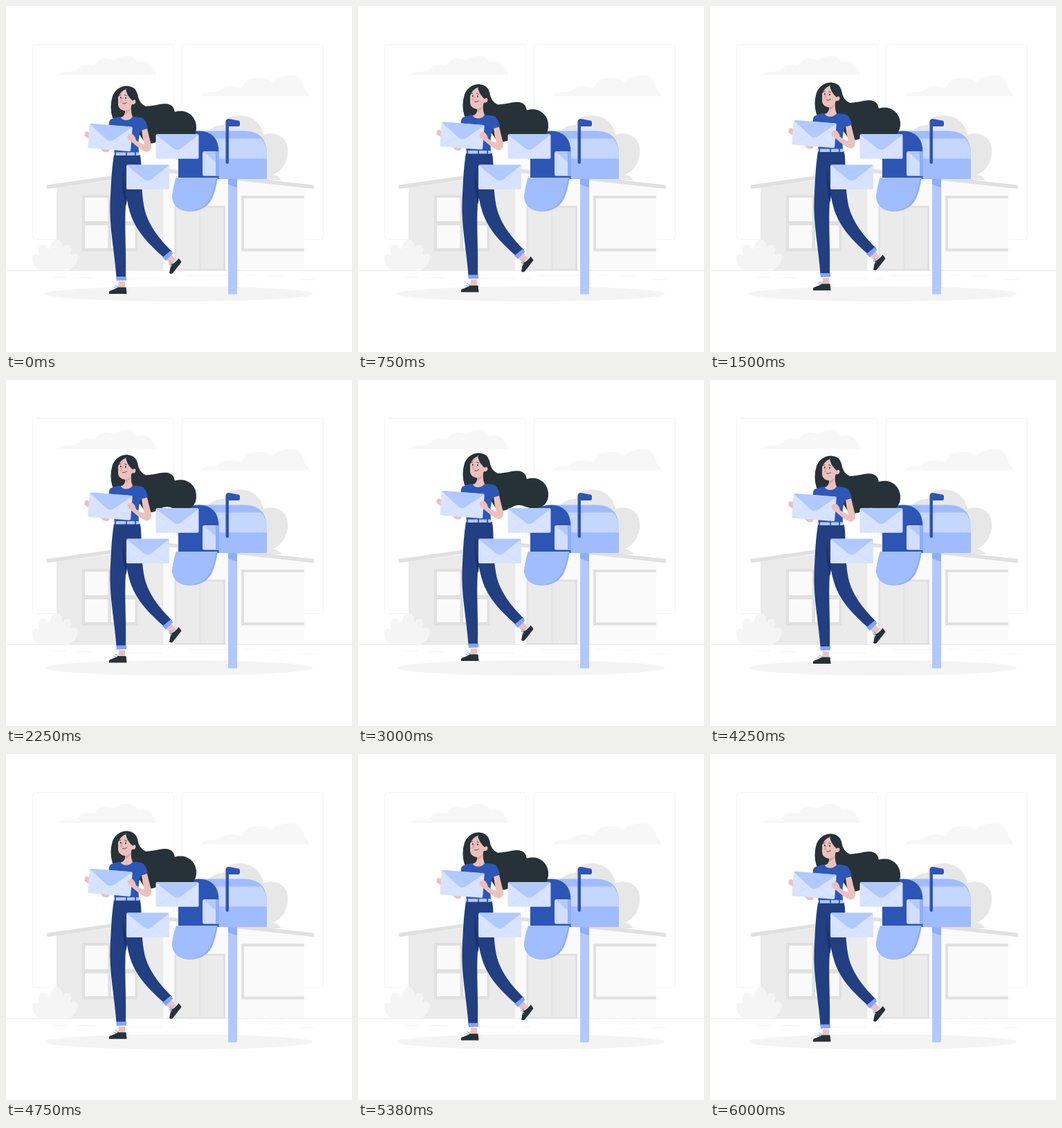
Animation, 500 px wide and 500 px high, one loop 6040 ms. Source, as an HTML page:

```html
<!DOCTYPE html>
<html lang="en">
<head>
<meta charset="utf-8">
<title>Mailbox</title>
<style>
  html, body { margin: 0; width: 100%; height: 100%; overflow: hidden; background: #fff; }
  svg { display: block; width: 100vw; height: 100vh; }
</style>
</head>
<body>
<svg viewBox="0 0 500 500" fill="none">
  <defs>
    <g id="envelope">
      <rect width="62" height="35.5" rx="2" fill="#d8e3ff"/>
      <path d="M1 35 27 17.5H35L61 35" stroke="#cbdaff" stroke-width=".7"/>
      <path d="M.6 1Q1 0 2.5 0H59.5Q61 0 61.4 1L36.5 20.8Q31 25 25.5 20.8Z" fill="#b0c9ff"/>
    </g>
  </defs>

  <g id="backdrop">
    <g stroke="#f3f3f3">
      <rect x="38.5" y="55.5" width="204" height="282" rx="4"/>
      <rect x="254.5" y="55.5" width="204" height="282" rx="4"/>
    </g>
    <g fill="#f7f7f7">
      <path d="M74 99.5Q83 94 94 95Q105 93 108 87Q118 83 127 86Q134 75 145 76Q152 76 156 79Q164 71 177 72Q187 73 190 82Q197 78 204 82Q210 82 212 90Q217 93 216 99.5Z"/>
      <path d="M281 130.5Q287 123 299 124Q306 124 310 121Q318 115 328 116Q336 117 341 119Q346 104 362 104Q376 103 384 110Q394 99 413 100Q429 101 432 122Q438 124 438 130.5Z"/>
    </g>
    <path d="M0 382.5H500" stroke="#ededed"/>
    <path d="M65 392H87M102 392.5H126M176 394H226M240 394H248M262 389.500H330M345 389H360M377 390H402M425 395.500H447" stroke="#f3f3f3"/>
    <path d="M292 181Q302 171 314 172Q319 158 339 158Q366 160 372 186Q391 180 403 194Q412 209 402 230Q396 239 386 244Q395 246 398 252H292Z" fill="#e7e7e7"/>

    <path d="M73 262 236 241V382H73Z" fill="#ebebeb"/>
    <path d="M227 242 245 241 431 261V382H227Z" fill="#fafafa"/>
    <path d="M59 261.500 154 248 236 238.500 445 261.500" stroke="#e0e0e0" stroke-width="5.500"/>
    <path d="M243.500 382V288.500H317V382Z" fill="#e0e0e0"/>
    <path d="M246 380V291H314V380Z" fill="#ebebeb"/>
    <path d="M280.500 291V380" stroke="#e0e0e0"/>
    <path d="M110 273H190V354.500H110Z" fill="#e0e0e0"/>
    <path d="M114 277H147.500V311H114ZM114 317H147.500V350H114ZM152 277H186.500V311H152ZM152 317H186.500V350H152Z" fill="#fafafa"/>
    <path d="M431 276H342V352.500H431" stroke="#e0e0e0" stroke-width="4"/>
    <path d="M47 382Q37 374 38 362Q41 357 48 361Q45 348 51 345Q59 344 63 352Q64 339 74 337Q82 338 81 351Q86 343 93 347Q96 350 93 359Q100 355 104 361Q104 375 91 382Z" fill="#f5f5f5"/>
    <ellipse cx="249.500" cy="416" rx="194" ry="11" fill="#f4f4f4"/>
  </g>

  <g id="mailbox">
    <path d="M321 249H334V416.500H321Z" fill="#b0c9ff"/>
    <path d="M321 249H334V262.500L321 258Z" fill="#8eaefb"/>
    <path d="M278 180.500H346Q377 182 377 214V250H278Z" fill="#9fbcff"/>
    <path d="M300 191.500H368.500Q377 201 377 214V220.500H300Z" fill="#c5d7ff"/>
    <path d="M249 250V211Q250 181 278 180.500Q307 181 307.500 211V250Z" fill="#2d55b5"/>
    <path d="M307.500 210H287Q284 210 284 213V243Q284 245.500 287 245.500H307.500Z" fill="#d0deff"/>
    <path d="M286 210.500H303V226Z" fill="#b0c9ff"/>
    <path d="M303 210H307.500V245.500H303Z" fill="#8eaefb"/>
    <path d="M246 248H306Q303 267 297 280Q287 297 264 297Q242 295 240 276Q241 264 246 248Z" fill="#8eaefb"/>
    <path d="M246 248H303.500Q301 266 294.500 279Q285 295 263 296.500Q242 295 240 276Q241 264 246 248Z" fill="#a0bdff"/>
    <path d="M317.500 226V167Q318 163 322 163L335 165.500Q338 166 338 168V171.500Q338 174 335 174H322V226Q322 228 320 228Q317.500 228 317.500 226Z" fill="#2d55b5"/>
  </g>

  <g id="woman">
    <path d="M154 162Q149 146 154 130Q160 116 175 115.500Q187 116 190 127Q192 141 202 145Q214 144 222 142Q237 139 242 147L244 153Q257 149 267 157Q276 165 275 178Q274 189 264 194Q254 198 242 193Q231 188 222 194Q211 201 201 198L184 172Z" fill="#263238"/>

    <path d="M121 183 116 181 114 183 113.500 188 120 192Z" fill="#ecc1bd"/>
    <path d="M134 204 151 204 149 210Q145 213 140 210Z" fill="#ecc1bd"/>

    <path d="M163 398H172V408H162Z" fill="#ecc1bd"/>
    <path d="M149 416V413Q149.500 411.500 152 411Q158 409 161.500 406.500H173.500L174.500 416Z" fill="#263238"/>
    <path d="M155.500 406 160 408M157.500 403.500 162 406" stroke="#7fa4fb" stroke-width="1.200"/>
    <path d="M231 366 238 358 245 367 239 375Z" fill="#ecc1bd"/>
    <path d="M249.500 364.500Q252 367 253.500 370L241 386Q239 388 236 386Q237 379 239 373.500Q245 371 249.500 364.500Z" fill="#263238"/>
    <path d="M235.500 372.500 240 376M237 370 241 373" stroke="#7fa4fb" stroke-width="1.200"/>

    <path d="M174 217H194C197 230 194 253 199 287C203 315 223 338 240 355L230 365C207 345 185 323 178 294C172 270 168 240 174 217Z" fill="#223f82"/>
    <path d="M156 215H194L190 238L174 247Q177 265 173 287C171 319 174 352 173 392H159.500C157 357 149 318 150.500 284C152 260 152 240 156 215Z" fill="#223f82"/>
    <path d="M169 239Q167 266 173.500 289L175 278Q170 260 170 239Z" fill="#19316a"/>
    <path d="M159 391 174 391 174 396.500 160 397Z" fill="#7fa4fb"/>
    <path d="M226 363.500 238 353.500 241.500 357.500 231 368Z" fill="#7fa4fb"/>

    <path d="M151 164Q159 160 169 160H182Q194 160 199 163Q203 168 205 176L195 180Q190 191 192 212H156.500L155 181L149 174Q148 167 151 164Z" fill="#2d57b7"/>
    <path d="M156.500 211.500H192.500V216H156.500Z" fill="#b0c9ff"/>
    <path d="M158 211V217M174 211V217M187 211V217" stroke="#223f82" stroke-width="1.500"/>

    <path d="M171 147 181 144Q180 154 183 160Q180 165 173 165Q167 164 166 161Q173 159 172 150Z" fill="#ecc1bd"/>
    <path d="M172 150Q178 150 180 147Q179 153 172.500 156Z" fill="#dda39f"/>
    <path d="M162 131Q165 122 174 119Q180 122 183 136Q187 134 187.500 138Q187 143 182 142Q179 151 172 151.500Q163 150 162 143Z" fill="#ecc1bd"/>
    <path d="M174 120Q166 122 162 132Q159 139 162 149L155 148 157 126 174 116ZM173 119Q174 129 183 137L188 133Q187 121 179 118Z" fill="#263238"/>
    <ellipse cx="165.800" cy="132.500" rx=".9" ry="1.300" fill="#263238"/>
    <ellipse cx="173" cy="133" rx=".9" ry="1.300" fill="#263238"/>
    <path d="M163.500 129.300 166 128.500M171.500 128.700 174.500 129.800M168.500 141Q172 142 174.500 139.500" stroke="#263238" stroke-width=".8" stroke-linecap="round"/>
    <path d="M168.500 133 166.800 137 168.300 137.500" stroke="#d48c88" stroke-width=".8"/>
    <circle cx="166" cy="137.500" r="1.700" fill="#e59e9b" opacity=".6"/>

    <use href="#envelope" transform="translate(121 169.800) rotate(4.500)"/>

    <path d="M196 179.500 204 177Q207 190 210 201Q210.500 210 203 211Q196 209 184 198.500L177 193Q174 188 177 186Q181 183 184 186Q187 189 188 194Q194 199 200 200Q197 190 196 179.500Z" fill="#ecc1bd"/>
  </g>

  <use href="#envelope" x="216.500" y="185.200"/>
  <use href="#envelope" x="174" y="229.500"/>
</svg>
<script>
  const LOOP = 6040;
  const RISE = 10;
  const woman = document.getElementById("woman");

  // Steady rise over the first half of the loop, steady return over the second.
  function draw(time) {
    const phase = (time % LOOP) / LOOP;
    const lift = RISE * (1 - Math.abs(1 - 2 * phase));
    woman.setAttribute("transform", `translate(0 ${-lift.toFixed(3)})`);
  }

  let start;
  function tick(now) {
    start ??= now;
    draw(now - start);
    requestAnimationFrame(tick);
  }

  draw(0);
  requestAnimationFrame(tick);
</script>
</body>
</html>
```
